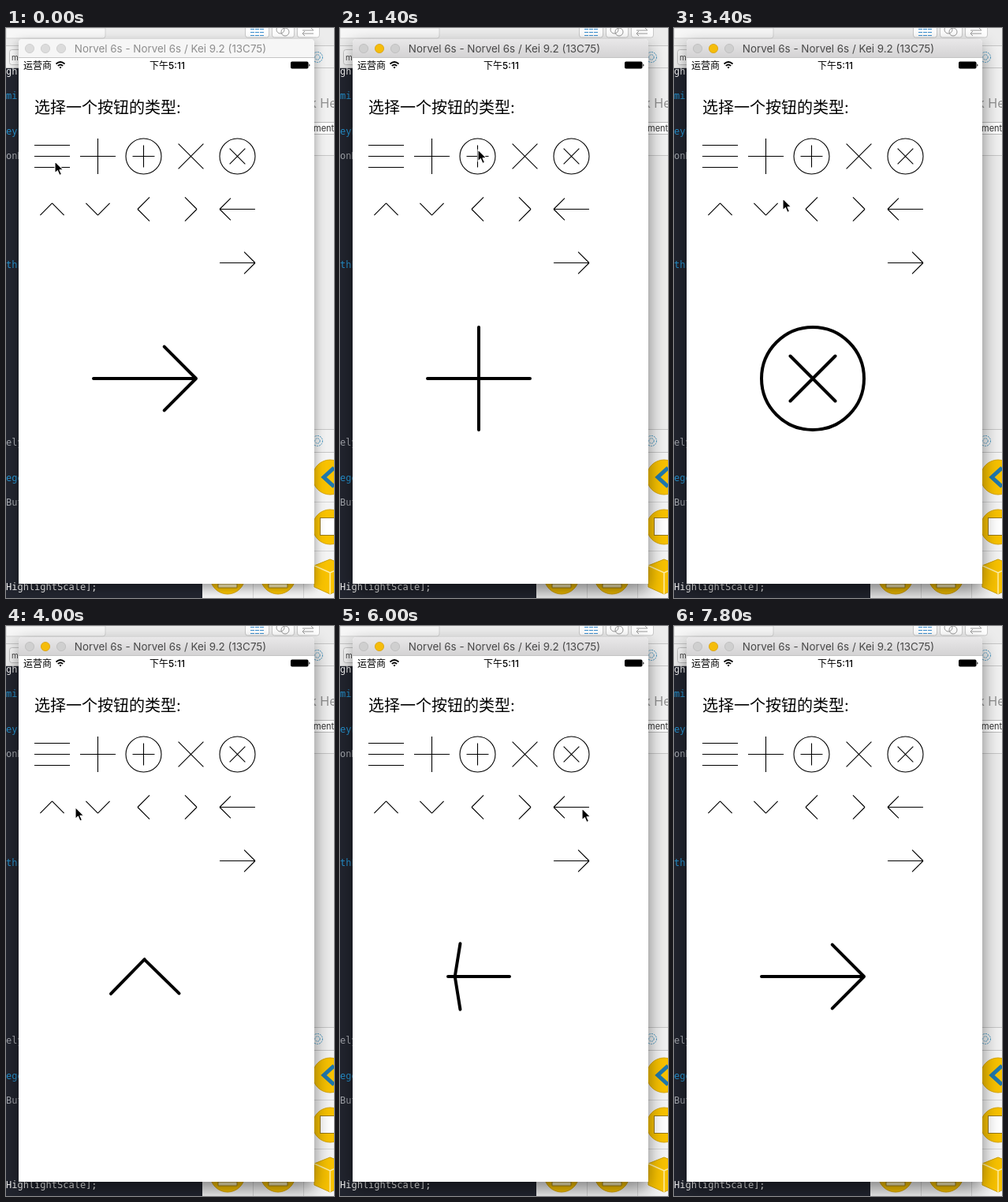
An HTML page for the animation above (8000 ms loop, 416 px wide and 722 px high).

```html
<!DOCTYPE html>
<html lang="zh-CN">
<head>
<meta charset="utf-8">
<title>Button types</title>
<style>
  html, body { margin: 0; width: 100%; height: 100%; overflow: hidden; background: #fff; }
  svg { display: block; width: 416px; height: 722px; }
  text { font-family: Inter, "Noto Sans CJK SC", "Noto Sans CJK", sans-serif; white-space: pre; }
  .code text { font: 12px "DejaVu Sans Mono", "Noto Sans Mono", monospace; fill: #a4a7ad; }
  .code .key { fill: #2592cf; }
  .code .call { fill: #f2f2f2; }
  #shell { filter: drop-shadow(0 5px 7px rgba(0,0,0,.38)); }
  .active #shell { filter: drop-shadow(0 9px 11px rgba(0,0,0,.48)); }
  #bar { fill: #f6f6f6; }
  .active #bar { fill: url(#chrome); }
  #caption { fill: #8d8d8d; }
  .active #caption { fill: #484848; }
  .light { fill: #dcdcdc; stroke: #c9c9c9; stroke-width: .8; }
  .active .light { fill: #cfcfcf; stroke: #bcbcbc; }
  .active #minimize { fill: #f5bd0b; stroke: #d9a014; }
</style>
</head>
<body>
<svg viewBox="0 0 416 722">
  <defs>
    <linearGradient id="chrome" x2="0" y2="1">
      <stop stop-color="#e9e8e9"/><stop offset="1" stop-color="#d3d2d3"/>
    </linearGradient>
    <g id="ring" fill="none" stroke="#4b9ac4">
      <circle r="6.5" stroke-dasharray="2 1"/><circle r="3.2" stroke-dasharray="2 1"/>
    </g>
    <circle id="disc" r="22" fill="#f8c200" stroke="#d9a500"/>
  </defs>

  <g id="editor">
    <rect width="416" height="722" fill="#f1f1f1"/>
    <rect width="416" height="22" fill="#ececec"/>
    <path d="M0 0H126V10Q126 13 123 13H0z" fill="#f7f7f7" stroke="#d2d2d2"/>
    <g fill="#fff" stroke="#c9c9c9">
      <rect x="303.5" y="-8" width="30" height="20" rx="3"/>
      <rect x="337.5" y="-8" width="28" height="20" rx="3"/>
      <rect x="369.5" y="-8" width="28" height="20" rx="3"/>
    </g>
    <path d="M310 1.5h18M310 5.5h18M310 9.5h18" stroke="#3b8fd0" stroke-dasharray="5 1"/>
    <g fill="none" stroke="#999">
      <circle cx="348" cy="2" r="5"/><circle cx="354" cy="5" r="5"/>
      <path d="M376 3h14l-3-3M390 7h-14l3-3M376 7l3 3"/>
    </g>
    <path d="M0 22.5H416M0 50.5H416" stroke="#c6c6c6"/>
    <rect x="4.5" y="27.5" width="30" height="19" rx="3" fill="#fafafa" stroke="#c4c4c4"/>
    <text x="7" y="41" font-size="10" fill="#444">m</text>

    <g class="code">
      <rect y="51" width="249" height="671" fill="#22252f"/>
      <text class="call" x="0" y="59">gh</text>
      <text class="key" x="0" y="90">mir</text>
      <text class="key" x="0" y="135">eyF</text>
      <text x="0" y="166">onH</text>
      <text class="key" x="0" y="304">thF</text>
      <text x="0" y="529">ely</text>
      <text class="key" x="0" y="574">ege</text>
      <text x="0" y="605">But</text>
      <text class="call" x="0" y="712">HighlightScale];</text>
    </g>

    <use href="#ring" x="395" y="37"/>
    <text x="385" y="101" font-size="16" fill="#929292">k Help</text>
    <rect x="370.5" y="119.5" width="60" height="15" fill="#fff" stroke="#bbb"/>
    <text x="390" y="131" font-size="11" fill="#333">mental</text>
    <path d="M391 161.5H416M391 508.5H416M391 537.5H416" stroke="#c6c6c6"/>
    <rect x="391" y="162" width="25" height="346" fill="#ececec"/>
    <use href="#ring" x="395" y="523"/>
    <rect x="249" y="538" width="167" height="184" fill="#f4f4f4"/>
    <path d="M391 600.5H416M391 662.5H416M313.5 704V722M377.5 704V722" stroke="#d5d5d5"/>
    <use href="#disc" x="281" y="695"/><use href="#disc" x="345" y="695"/>
    <use href="#disc" x="411" y="569"/><use href="#disc" x="411" y="632"/>
    <path d="M416 557L403 569L416 581" fill="none" stroke="#1f78ad" stroke-width="5"/>
    <rect x="398.5" y="620.5" width="24" height="22" fill="#fff" stroke="#9a7a16"/>
    <path d="M269 704h24v5h-24zM333 704h24v5h-24z" fill="#fff3bd" stroke="#a88719"/>
    <path d="M391 681L411 673L431 681V708L411 717L391 708z" fill="#f8c200" stroke="#cfa000"/>
    <path d="M391 681L411 690L431 681M411 690V717" fill="none" stroke="#fff0a8" stroke-width="1.5"/>
  </g>

  <path id="shell" d="M16 704V19Q16 14 21 14H386Q391 14 391 19V704z" fill="#fff"/>
  <path id="bar" d="M16 38V19Q16 14 21 14H386Q391 14 391 19V38z"/>
  <path d="M16 37.5H391" stroke="#c4c4c4"/>
  <circle class="light" cx="30" cy="26" r="5.6"/>
  <circle class="light" id="minimize" cx="50" cy="26" r="5.6"/>
  <circle class="light" cx="70" cy="26" r="5.6"/>
  <text id="caption" x="208.5" y="31" font-size="13.4" text-anchor="middle">Norvel 6s - Norvel 6s / Kei 9.2 (13C75)</text>

  <text x="22" y="51.5" font-size="12">运营商</text>
  <g fill="none" stroke="#000" stroke-width="1.7">
    <path d="M63.5 45.5Q69 40.5 74.5 45.5M65.8 48Q69 45 72.2 48"/>
    <path d="M67.5 49.5L69 51.5L70.5 49.5Q69 48.300 67.5 49.5z" fill="#000" stroke="none"/>
  </g>
  <text x="204.5" y="51.5" font-size="12" font-weight="500" text-anchor="middle">下午5:11</text>
  <rect x="361" y="42.5" width="22.5" height="9" rx="1.8"/>
  <path d="M384.3 45.2q2.4 1.800 0 3.600z"/>
  <text x="36" y="107.5" font-size="20">选择一个按钮的类型:</text>

  <g id="icons" fill="none" stroke="#000" stroke-width="1.1"></g>
  <path id="button" fill="none" stroke="#000" stroke-width="4" stroke-linecap="round" stroke-linejoin="round"/>
  <path id="cursor" d="M0 -1V14L3.400 10.700L5.900 16.500L8.500 15.300L6 9.700H10.600z"
        fill="#000" stroke="#fff" stroke-width="1.1" stroke-linejoin="round"/>
</svg>

<script>
const LOOP = 8000, STEP = 200, MORPH = 380;
const byId = id => document.getElementById(id);
const lerp = (a, b, p) => a + (b - a) * p;

// A shape is three segments [x1, y1, x2, y2] and a ring radius, in units of the half size.
const NONE = [0, 0, 0, 0];
const D = Math.SQRT1_2, TIP = .336, HEAD = .62;
const shape = (a, b, c, ring = 0) => ({ lines: [a, b, c], ring });
const plus = (r, ring) => shape(NONE, [0, -r, 0, r], [-r, 0, r, 0], ring);
const cross = (r, ring) => shape(NONE, [-r, -r, r, r], [-r, r, r, -r], ring);
const caretY = s => shape(NONE, [0, s * TIP, -2 * TIP, -s * TIP], [0, s * TIP, 2 * TIP, -s * TIP]);
const caretX = s => shape(NONE, [s * TIP, 0, -s * TIP, -2 * TIP], [s * TIP, 0, -s * TIP, 2 * TIP]);
const arrow = s => shape([-1, 0, 1, 0], [s, 0, s * (1 - HEAD), -HEAD], [s, 0, s * (1 - HEAD), HEAD]);

const shapes = {
  menu: shape([-1, 0, 1, 0], [-1, -HEAD, 1, -HEAD], [-1, HEAD, 1, HEAD]),
  plus: plus(1), ringPlus: plus(HEAD, 1),
  cross: cross(D), ringCross: cross(HEAD * D, 1),
  up: caretY(-1), down: caretY(1), left: caretX(-1), right: caretX(1),
  back: arrow(-1), forward: arrow(1)
};

const columns = [58.5, 116.5, 174.5, 234.5, 293.5];
const rows = [
  [162.5, ["menu", "plus", "ringPlus", "cross", "ringCross"]],
  [229.5, ["up", "down", "left", "right", "back"]],
  [297.5, [, , , , "forward"]]
];

const clicks = [
  [200, "menu"], [900, "plus"], [1500, "ringPlus"], [2100, "cross"],
  [2900, "ringCross"], [3700, "up"], [4300, "down"], [4900, "left"],
  [5400, "right"], [5900, "back"], [6500, "forward"]
];

// Pointer stops: [time, x, y]
const stops = [
  [0, 62, 170], [400, 62, 170], [800, 119, 165], [1000, 119, 165],
  [1400, 175, 155], [1700, 175, 155], [2100, 232, 157], [2600, 232, 157],
  [2800, 293, 163], [3100, 293, 163], [3400, 138, 217], [3600, 60, 230],
  [3800, 60, 230], [4200, 116, 231], [4400, 116, 231], [4800, 168, 232],
  [5000, 168, 232], [5300, 235, 231], [5500, 235, 231], [5800, 307, 232],
  [6000, 307, 232], [6400, 301, 296], [6700, 301, 296], [7000, 345, 300], [7200, 345, 300]
];

function mix(from, to, p) {
  return {
    lines: from.lines.map((line, i) => line.map((v, k) => lerp(v, to.lines[i][k], p))),
    ring: lerp(from.ring, to.ring, p)
  };
}

function outline({ lines, ring }, cx, cy, size) {
  let d = "";
  for (const [x1, y1, x2, y2] of lines) {
    if (Math.hypot(x2 - x1, y2 - y1) < .05) continue;
    d += `M${cx + x1 * size} ${cy + y1 * size}L${cx + x2 * size} ${cy + y2 * size}`;
  }
  const r = ring * size;
  if (ring > .05) d += `M${cx - r} ${cy}a${r} ${r} 0 1 1 ${2 * r} 0a${r} ${r} 0 1 1 ${-2 * r} 0z`;
  return d;
}

function buttonAt(t) {
  let current = shapes.forward;
  for (const [start, name] of clicks) {
    if (t < start) break;
    const u = Math.min(1, (t - start) / MORPH);
    current = mix(current, shapes[name], 1 - (1 - u) ** 3);
  }
  return current;
}

function pointerAt(t) {
  const next = stops.findIndex(stop => stop[0] > t);
  if (next < 0) return stops[stops.length - 1].slice(1);
  const [t0, x0, y0] = stops[next - 1], [t1, x1, y1] = stops[next];
  const u = (t - t0) / (t1 - t0), p = u * u * (3 - 2 * u);
  return [lerp(x0, x1, p), lerp(y0, y1, p)];
}

function render(t) {
  document.body.classList.toggle("active", t >= STEP);
  byId("button").setAttribute("d", outline(buttonAt(t), 176, 444, 65));
  byId("cursor").setAttribute("transform", `translate(${pointerAt(t)})`);
  byId("cursor").setAttribute("visibility", t < 7400 ? "visible" : "hidden");
}

for (const [y, names] of rows) {
  names.forEach((name, i) => {
    const icon = document.createElementNS("http://www.w3.org/2000/svg", "path");
    icon.setAttribute("d", outline(shapes[name], columns[i], y, 22.5));
    byId("icons").append(icon);
  });
}

const began = performance.now();
function tick() {
  const t = (performance.now() - began) % LOOP;
  render(Math.floor(t / STEP) * STEP);
  requestAnimationFrame(tick);
}
render(0);
requestAnimationFrame(tick);
</script>
</body>
</html>
```
